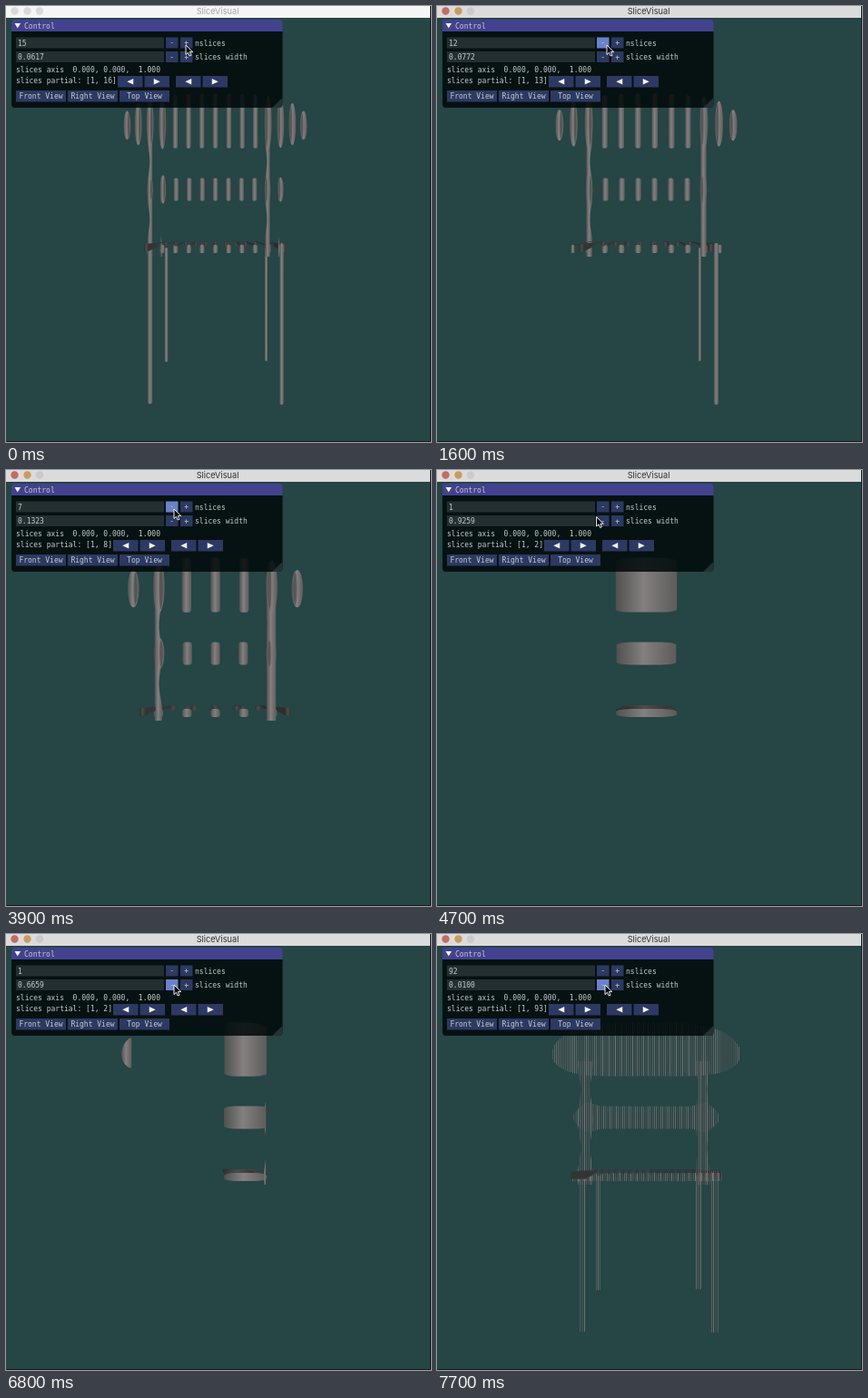
Recreate the animation shown at these times as an HTML page with a canvas. Size 468 by 480 pixels, loop 8000 ms.

```html
<!DOCTYPE html>
<html lang="en">
<head>
<meta charset="utf-8">
<title>SliceVisual</title>
<style>
  html, body { margin: 0; width: 100%; height: 100%; overflow: hidden; background: #264545; }
  canvas, svg { position: absolute; left: 0; top: 0; width: 468px; height: 480px; display: block; }
  text { font: 8px "DejaVu Sans Mono", monospace; fill: #c3cccc; white-space: pre; }
  #name { font: 9.2px Inter, sans-serif; text-anchor: middle; }
</style>
</head>
<body>
<canvas id="view" width="468" height="480"></canvas>
<svg id="ui" viewBox="0 0 468 480">
  <rect id="bar" width="467" height="13"/>
  <circle class="light" cx="9.5" cy="5.5" r="4.2"/>
  <circle class="light" cx="23.5" cy="5.5" r="4.2"/>
  <circle class="light" cx="37" cy="5.5" r="4.2"/>
  <text id="name" x="233" y="9">SliceVisual</text>
  <path d="M467.5 0V479.5H0" fill="none" stroke="#101c1e"/>
  <path d="M6 28H304.5V108q0 4-4 4H10q-4 0-4-4Z" fill="#000909" fill-opacity=".85"/>
  <path d="M6 28V19q0-4 4-4H300.5q4 0 4 4V28Z" fill="#42428e"/>
  <path d="M304.5 101V108q0 4-4 4H293Z" fill="#263136"/>
  <path d="M9.5 19h6.6l-3.3 5.6Z" fill="#f2f2f2"/>
  <text x="20" y="25">Control</text>
  <rect x="11" y="34.5" width="163" height="12" fill="#232f30"/>
  <rect x="11" y="50" width="163" height="12" fill="#232f30"/>
  <text id="count" x="13" y="43.5"></text>
  <text id="width" x="13" y="59"></text>
  <text x="208" y="43.5">nslices</text>
  <text x="208" y="59">slices width</text>
  <text x="11" y="73">slices axis  0.000, 0.000,  1.000</text>
  <text id="part" x="11" y="84.5"></text>
  <g id="buttons"></g>
  <g id="arrows"></g>
  <path id="mouse" d="M0 0V10.5L2.5 8.3 4.2 12 6 11.2 4.4 7.6H7.8Z" fill="#0b0b0b" stroke="#fff" stroke-width=".9"/>
</svg>
<script>
const LOOP = 8000, SPAN = 0.9259, EDGE = SPAN / 2, CX = 230.5;
const $ = id => document.getElementById(id);
const ctx = $('view').getContext('2d');
const clamp = (v, a, b) => Math.min(b, Math.max(a, v));

// ---- timeline ----
const COUNTS = [[0, 15], [500, 14], [900, 13], [1400, 12], [1800, 11], [2000, 10],
  [2400, 9], [3000, 8], [3500, 7], [4200, 5], [4300, 3], [4400, 1]];
const MOUSE = [[0, 198, 43], [100, 198, 43], [500, 187, 43], [3000, 187, 43], [3200, 185, 43],
  [4600, 185, 43], [4800, 166, 60], [5000, 228, 72], [5400, 181, 56], [6100, 181, 56],
  [6200, 182, 66], [6300, 185, 56], [8000, 185, 56]];

function sliceState(t) {
  if (t < 5600) {
    const [since, n] = COUNTS.filter(c => c[0] <= t).pop();
    return { n, w: SPAN / n, geo: SPAN / n, pressed: since > 0 && t - since < 200 };
  }
  const slow = clamp((t - 5600) / 100, 0, 4);
  const fast = Math.round(7.43 * clamp((t - 6500) / 100, 0, 12));
  const w = Math.max(0.01, SPAN - 0.01 * (slow + fast));
  return { n: Math.floor(SPAN / w), w, geo: fast && w > 0.05 ? w - 0.02 : w, pressed: false };
}

function mouseAt(t) {
  const i = MOUSE.findIndex(m => m[0] > t);
  const [t0, x0, y0] = MOUSE[i - 1], [t1, x1, y1] = MOUSE[i];
  const k = (t - t0) / (t1 - t0);
  return [x0 + (x1 - x0) * k, y0 + (y1 - y0) * k];
}

// ---- chair, cut into bands along its width u ----
const backX = u => CX + 241 * u - 87 * u ** 3;
const nearX = u => CX + 233 * u;
const seatX = u => CX + 237 * u;
const sideX = u => CX + 205 * u;
const farX = u => CX + 0.5 + 177 * u;
const backMid = u => 126.5 + 26 * u * u;
const backHalf = u => 30 * Math.sqrt(Math.max(0, 1 - (Math.abs(u) / 0.468) ** 3.2));
const railMid = () => 202;
const railHalf = u => (12.5 + 5 * Math.exp(-(((Math.abs(u) - 0.28) / 0.04) ** 2)))
  * Math.sqrt(Math.max(0, 1 - (Math.abs(u) / 0.345) ** 9));

function metal(x0, x1, dark) {
  const g = ctx.createLinearGradient(x0, 0, Math.max(x1, x0 + 0.1), 0);
  const tones = dark ? ['#2b2e2d', '#4c4c4b', '#333534'] : ['#515150', '#83807f', '#5e5c5b'];
  tones.forEach((c, i) => g.addColorStop([0, 0.45, 1][i], c));
  return g;
}

function fillPath(points, x0, x1, dark) {
  ctx.beginPath();
  points.forEach(p => ctx.lineTo(p[0], p[1]));
  ctx.closePath();
  ctx.fillStyle = metal(x0, x1, dark);
  ctx.fill();
}

// Part lying mid ± half over u, with softened corners
function strip(u0, u1, limit, x, mid, half, dark) {
  const a = Math.max(u0, -limit), b = Math.min(u1, limit);
  if (a >= b) return;
  const up = [], down = [], soft = Math.min(2.5, (b - a) * 90);
  for (let i = 0; i <= 16; i++) {
    const u = a + (b - a) * i / 16;
    const h = Math.max(0, half(u) - soft * (i / 8 - 1) ** 6);
    up.push([x(u), mid(u) - h]);
    down.unshift([x(u), mid(u) + h]);
  }
  fillPath(up.concat(down), x(a), x(b), dark);
}

// A grazing cut still shows some of the leg's inside
function leg(u0, u1, lo, hi, x, top, bottom, inside) {
  let a = x(Math.max(u0, lo)), b = x(Math.min(u1, hi));
  if (a >= b) return;
  const grow = Math.max(0, Math.min(inside, 60 * (u1 - u0) / 0.3) - (b - a));
  if (u0 > lo) a -= grow; else b += grow;
  ctx.beginPath();
  ctx.roundRect(a, top, b - a, bottom - top, Math.min(2.5, (b - a) / 2));
  ctx.fillStyle = metal(a, b);
  ctx.fill();
}

function post(u0, u1, mid) {
  const left = [], right = [];
  for (let y = 140; y <= 276; y += 4) {
    const half = 0.022 + 0.015 * Math.cos(Math.PI * (y - 203) / 64) ** 2;
    const a = Math.max(u0, mid - half), b = Math.max(a, Math.min(u1, mid + half));
    left.push([nearX(a), y]);
    right.unshift([nearX(b), y]);
  }
  fillPath(left.concat(right), nearX(Math.max(u0, mid - 0.037)), nearX(Math.min(u1, mid + 0.037)));
}

function lens(x, y, rx, ry, side) {
  if (ry < 2) return;
  ctx.beginPath();
  ctx.ellipse(x, y, rx, ry, 0, 0, 7);
  ctx.fillStyle = metal(x - rx, x + rx);
  ctx.fill();
  ctx.beginPath();
  ctx.ellipse(x - side * rx * 0.35, y, rx * 0.3, ry * 0.85, 0, 0, 7);
  ctx.fillStyle = 'rgba(45,48,47,.4)';
  ctx.fill();
}

function seat(a, b, c) {
  if (Math.abs(c) > 0.33) {
    const l = clamp(a, -0.405, 0.405), r = clamp(b, -0.405, 0.405);
    const [out, inn] = c < 0 ? [l, r] : [r, l];
    if (l < r) {
      fillPath([[sideX(out), 262], [farX(inn), 260.5], [farX(inn), 265], [sideX(inn), 270],
        [sideX(out), 271]], sideX(l), sideX(r), true);
    }
  }
  const l = clamp(a, -0.35, 0.35), r = clamp(b, -0.35, 0.35);
  if (l >= r) return;
  fillPath([[seatX(l), 267], [seatX(l), 264], [farX(l), 259], [farX(r), 259],
    [seatX(r), 264], [seatX(r), 267]], seatX(l), seatX(r), true);
  strip(a, b, 0.33, farX, () => 262, () => 2.5, true);
  strip(a, b, 0.35, seatX, () => 267.5, () => 4.5);
}

function slice(c, w) {
  const half = w * 0.15 + Math.min(0.002, w * 0.03), a = c - half, b = c + half;
  const edge = Math.abs(c) > 0.23 && w < 0.2 && w > 0.03, side = Math.sign(c);
  leg(a, b, -0.318, -0.289, farX, 266, 392, 3);
  leg(a, b, 0.305, 0.338, farX, 266, 391, 3);
  seat(a, b, c);
  leg(a, b, -0.32, -0.287, nearX, 261, 438, 5);
  leg(a, b, 0.304, 0.341, nearX, 261, 439, 5);
  post(a, b, -0.288);
  post(a, b, 0.266);
  if (edge) {
    lens(nearX(c), railMid(), half * 220 + 0.8, railHalf(c) + 1, side);
    lens(backX(c), backMid(c), half * 225 + 1.4, backHalf(c) + 1.5, side);
  } else {
    strip(a, b, 0.345, nearX, railMid, railHalf);
    strip(a, b, 0.466, backX, backMid, backHalf);
  }
}

function drawChair(w) {
  ctx.fillStyle = '#264545';
  ctx.fillRect(0, 0, 468, 480);
  for (let c = EDGE - w / 2; c > -EDGE - 0.15 * w; c -= w) slice(c, w);
}

// ---- control panel ----
const buttons = [];
function button(parent, x, y, w, h, label) {
  const tag = (name, attrs) => {
    const e = document.createElementNS('http://www.w3.org/2000/svg', name);
    for (const k in attrs) e.setAttribute(k, attrs[k]);
    return parent.appendChild(e);
  };
  const box = tag('rect', { x, y, width: w, height: h });
  const mx = x + w / 2, my = y + h / 2;
  if (label === '<' || label === '>') {
    const s = label === '<' ? -3.5 : 3.5;
    tag('path', { d: `M${mx - s} ${my - 3.3}V${my + 3.3}L${mx + s} ${my}Z`, fill: '#f2f2f2' });
  } else {
    tag('text', { x: mx, y: my + 2.8, 'text-anchor': 'middle' }).textContent = label;
  }
  buttons.push({ box, x, y, w, h, shifts: parent === $('arrows') });
}
[34.5, 50].forEach(y => {
  button($('buttons'), 176, y, 13.5, 12, '-');
  button($('buttons'), 192, y, 13.5, 12, '+');
});
['Front View', 'Right View', 'Top View'].forEach((s, i) => button($('buttons'), 11 + 57 * i, 93, 55, 12.5, s));
[118, 147.5, 182, 211.5].forEach((x, i) => button($('arrows'), x, 77, 27.5, 12.5, '<><>'[i]));

function drawPanel(t, s) {
  const focused = t >= 100, [mx, my] = mouseAt(t), shift = s.n > 8 ? 5 : 0;
  $('bar').style.fill = focused ? '#dcdbdc' : '#f5f5f5';
  $('name').style.fill = focused ? '#303030' : '#a8a4a6';
  document.querySelectorAll('.light').forEach((e, i) => {
    e.style.fill = focused ? ['#c46a66', '#c99c5c', '#cacaca'][i] : '#d9d9d9';
  });
  $('count').textContent = s.n;
  $('width').textContent = s.w.toFixed(4);
  $('part').textContent = `slices partial: [1, ${s.n + 1}]`;
  $('arrows').setAttribute('transform', `translate(${shift})`);
  $('mouse').setAttribute('transform', `translate(${mx} ${my})`);
  for (const b of buttons) {
    const x = b.x + (b.shifts ? shift : 0);
    const over = focused && mx >= x && mx <= x + b.w && my >= b.y && my <= b.y + b.h;
    b.box.style.fill = !over ? '#2c3962' : s.pressed ? '#4a56a8' : '#6a82cc';
  }
}

function tick(now) {
  const t = Math.floor(now % LOOP / 100) * 100;
  const s = sliceState(t);
  drawChair(s.geo);
  drawPanel(t, s);
  requestAnimationFrame(tick);
}
tick(0);
</script>
</body>
</html>
```
